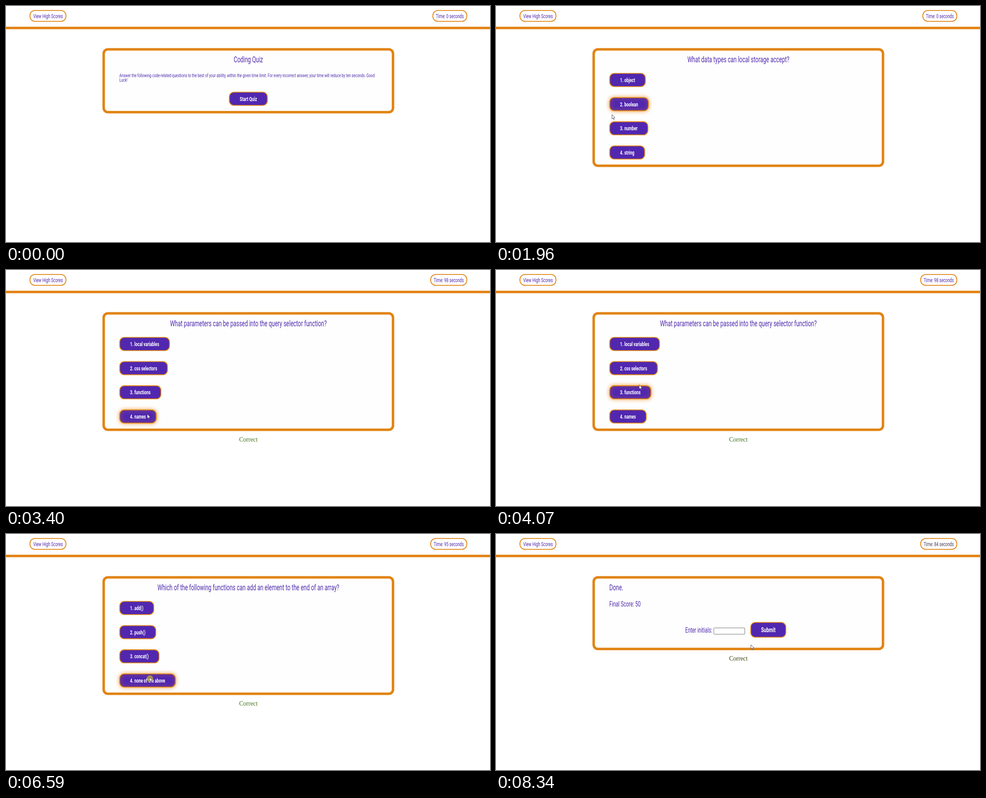
An HTML page with a canvas for the animation above (8.41 s loop, 1069x524 px).

```html
<!DOCTYPE html>
<html lang="en">
<head>
<meta charset="utf-8">
<title>Coding Quiz</title>
<style>
html, body { margin: 0; width: 100%; height: 100%; overflow: hidden; background: #fff; }
canvas { display: block; }
</style>
</head>
<body>
<canvas id="stage" width="1069" height="524"></canvas>
<script>
const ctx = document.getElementById('stage').getContext('2d');
const LOOP = 8410, CENTER = 535.3, LEFT = 250.3;
const ORANGE = '#e28413', PURPLE = '#5127b0', INK = '#4f2bab';
const GREEN = '#43741c', RED = '#b3261e';
const CONDENSE = 0.66; // one width ratio for the whole condensed face
const HOVER_LAG = 65, CLICK_MS = 140;

// In each scene the pointer moves to `goal` during `move`, bowing towards `via` if given.
const scenes = [
  { start: 0, move: [180, 790], goal: [541, 208] },
  { start: 1320, move: [1490, 2330], via: [138, 197], goal: [283, 318],
    title: 'What data types can local storage accept?', answers: ['object', 'boolean', 'number', 'string'] },
  { start: 2500, move: [2600, 3190], via: [280, 212], goal: [312, 320], verdict: 'Correct',
    title: 'What data types can a function return?', answers: ['string', 'number', 'boolean', 'all of the above'] },
  { start: 3400, move: [3554, 4450], goal: [319, 214], verdict: 'Correct',
    title: 'What parameters can be passed into the query selector function?',
    answers: ['local variables', 'css selectors', 'functions', 'names'] },
  { start: 4760, move: [4760, 5100], goal: [320, 283], verdict: 'Correct',
    title: 'Which of the following is not an HTML tag?', answers: ['body', 'canvas', 'concept', 'aside'] },
  { start: 5640, move: [5850, 6120], goal: [317, 318], verdict: 'Correct',
    title: 'Which of the following functions can add an element to the end of an array?',
    answers: ['add()', 'push()', 'concat()', 'none of the above'] },
  { start: 6720, move: [6760, 7400], goal: [317, 178], verdict: 'Incorrect',
    title: 'Which tag is used to link a JavaScript file?', answers: ['script', 'link', 'source', 'style'] },
  { start: 7730, move: [8040, 8340], goal: [563, 246] }
];
const ENTRY = [894, 458];
const DONE = scenes[7].start, WRONG = scenes[6].start;

const sceneIndex = t => Math.max(0, scenes.findLastIndex(s => s.start <= t));

function pointerAt(t) {
  const i = sceneIndex(t), { move: [t0, t1], via, goal } = scenes[i];
  if (t < scenes[0].move[0]) return [-99, -99];
  const from = i ? scenes[i - 1].goal : ENTRY;
  const k = Math.min(1, Math.max(0, (t - t0) / (t1 - t0)));
  const e = k * k * (3 - 2 * k);
  return from.map((a, n) => {
    const b = goal[n], c = via ? via[n] : (a + b) / 2;
    return (1 - e) ** 2 * a + 2 * e * (1 - e) * c + e * e * b;
  });
}

// A countdown from 100, with ten seconds lost for the wrong answer.
function secondsLeft(t) {
  const passed = Math.floor((t - 1360) / 1007);
  return passed < 1 ? 0 : 100 - passed - (t >= WRONG ? 10 : 0);
}

function setFace(size, weight) {
  ctx.font = `${weight} ${size}px Roboto, "Open Sans", sans-serif`;
}

function textWidth(str, size, weight = 400) {
  setFace(size, weight);
  return ctx.measureText(str).width * CONDENSE;
}

function text(str, x, y, size, { align = 'left', color = INK, weight = 400 } = {}) {
  ctx.save();
  setFace(size, weight);
  ctx.textAlign = align;
  ctx.fillStyle = color;
  ctx.translate(x, y);
  ctx.scale(CONDENSE, 1);
  ctx.fillText(str, 0, 0);
  ctx.restore();
}

// bordered box measured by its outer edges
function box(x, y, w, h, r, line, fill, stroke = ORANGE) {
  ctx.beginPath();
  ctx.roundRect(x + line / 2, y + line / 2, w - line, h - line, r - line / 2);
  ctx.fillStyle = fill;
  ctx.fill();
  ctx.lineWidth = line;
  ctx.strokeStyle = stroke;
  ctx.stroke();
}

function button(label, x, y, size, h, [px, py], center = false) {
  const w = textWidth(label, size, 700) + 47.5;
  if (center) x -= w / 2;
  ctx.save();
  if (px >= x && px <= x + w && py >= y && py <= y + h) {
    ctx.shadowColor = 'rgba(240, 138, 16, .75)';
    ctx.shadowBlur = 9;
  }
  box(x, y, w, h, 11, 1.8, PURPLE);
  ctx.restore();
  text(label, x + w / 2, y + h / 2 + size * 0.36, size, { align: 'center', color: '#fff', weight: 700 });
}

const card = bottom => box(213, 93.5, 644.5, bottom - 93.5, 12, 5.5, '#fefefe');
const heading = str => text(str, CENTER, 125, 18.2, { align: 'center' });

function verdict(str, y, color) {
  ctx.font = '13.6px "Liberation Serif", "Times New Roman", serif';
  ctx.textAlign = 'center';
  ctx.fillStyle = color;
  ctx.fillText(str, CENTER, y);
}

function header(t) {
  ctx.fillStyle = ORANGE;
  ctx.fillRect(0, 46, 1069, 5.5);
  box(52, 9, 81.3, 26, 12, 1.8, '#fff');
  text('View High Scores', 92.8, 26.5, 12.8, { align: 'center' });
  const label = `Time: ${secondsLeft(t)} seconds`;
  const w = textWidth(label, 12.8) + 15;
  const color = t >= DONE ? '#443c50' : t >= WRONG ? RED : INK;
  box(1018.7 - w, 9, w, 26, 12, 1.8, '#fff');
  text(label, 1011.2, 26.5, 12.8, { align: 'right', color });
}

function startScreen(hover) {
  card(238.5);
  heading('Coding Quiz');
  text('Answer the following code-related questions to the best of your ability, within the given time limit. ' +
    'For every incorrect answer, your time will reduce by ten seconds. Good', LEFT, 157.5, 11.5);
  text('Luck!', LEFT, 167.5, 11.5);
  button('Start Quiz', CENTER, 190.5, 12.9, 31, hover, true);
}

function questionScreen(scene, hover) {
  card(357.5);
  heading(scene.title);
  scene.answers.forEach((a, i) =>
    button(`${i + 1}. ${a}`, LEFT, 148.7 + i * 53.7, 12.8, 31, hover));
  if (scene.verdict) verdict(scene.verdict, 380.5, scene.verdict === 'Correct' ? GREEN : RED);
}

function doneScreen(hover) {
  card(258);
  text('Done.', LEFT, 125, 18.2);
  text('Final Score: 50', LEFT, 161.3, 16);
  text('Enter initials:', 418, 219.3, 15.8);
  box(480.5, 208, 69.5, 15, 2, 1, '#fff', '#767676');
  button('Submit', 601.4, 195.5, 15, 34.5, hover, true);
  verdict('Correct', 280.5, '#36430f');
}

function pointer(t) {
  const next = scenes[sceneIndex(t) + 1];
  ctx.save();
  ctx.translate(...pointerAt(t));
  if (next && t >= next.start - CLICK_MS) {
    ctx.beginPath();
    ctx.arc(1, 3, 7, 0, 7);
    ctx.fillStyle = 'rgba(215, 190, 45, .68)';
    ctx.fill();
  }
  const arrow = new Path2D('M0 0V9.5L2.2 7.6L3.8 11L5.2 10.4L3.8 7.1L6.6 6.8Z');
  ctx.fillStyle = '#fff';
  ctx.fill(arrow);
  ctx.lineWidth = 0.8;
  ctx.strokeStyle = '#33313f';
  ctx.stroke(arrow);
  ctx.restore();
}

function draw(t) {
  const scene = scenes[sceneIndex(t)];
  const hover = pointerAt(t - HOVER_LAG);
  ctx.fillStyle = '#fff';
  ctx.fillRect(0, 0, 1069, 524);
  header(t);
  if (scene.title) questionScreen(scene, hover);
  else if (t < DONE) startScreen(hover);
  else doneScreen(hover);
  pointer(t);
}

const begin = performance.now();
function tick() {
  draw((performance.now() - begin) % LOOP);
  requestAnimationFrame(tick);
}
tick();
</script>
</body>
</html>
```
